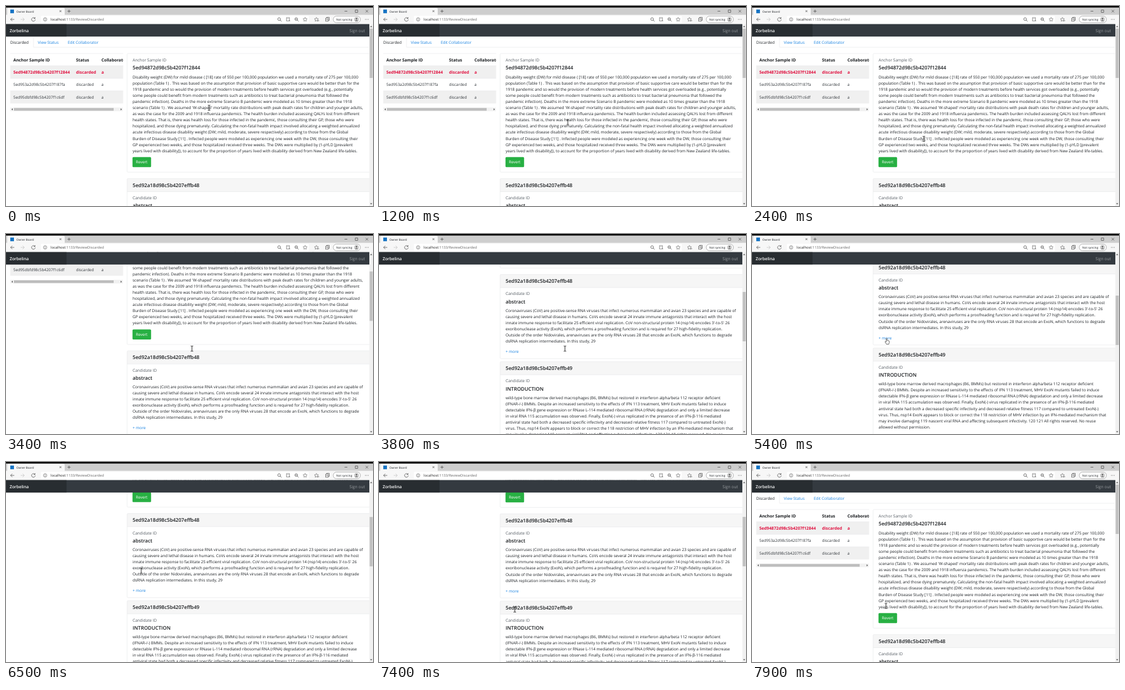
These frames come from a looping animation (600 by 328 pixels, 8 s). An HTML page:

```html
<!DOCTYPE html>
<html lang="en">
<head>
<meta charset="utf-8">
<title>Review page</title>
<style>
  @property --scroll { syntax: "<number>"; inherits: true; initial-value: 0; }
  html, body { margin: 0; width: 100%; height: 100%; overflow: hidden; background: #fff; }
  #stage {
    display: block; width: 100vw; height: 100vh;
    font: 6.45px "Open Sans", "Noto Sans", sans-serif;
    text-rendering: geometricPrecision;
    animation: scroll 8s linear infinite;
  }
  text { fill: #1d2125; white-space: pre; }
  .page { transform: translateY(calc(var(--scroll) * -1px)); }
  .thumb { transform: translateY(calc(var(--scroll) * .268px)); }
  .title { font-size: 8.15px; font-weight: 600; fill: #16191c; }
  .label { font-size: 6.6px; fill: #555c63; }
  .tab { font-size: 6.4px; }
  .link { fill: #1580e0; }
  .head { font-size: 6.75px; font-weight: 700; fill: #16191c; }
  .cell { font-size: 6.4px; fill: #30353a; }
  .picked { fill: #e0103f; }
  .line { fill: none; stroke: #e4e6e8; stroke-width: .6; }
  .icon { fill: none; stroke: #555; stroke-width: .8; }
  .cursor { animation: move 8s linear infinite; }
  .beam { animation: beam 8s step-end infinite; }
  .hand { animation: hand 8s step-end infinite; }
  @keyframes scroll {
    0%, 38.75% { --scroll: 0; }
    42.5% { --scroll: 91; }
    47.5% { --scroll: 216.5; }
    50%, 78% { --scroll: 239; }
    80.5%, 92.5% { --scroll: 198.5; }
    97.5%, 100% { --scroll: 0; }
  }
  @keyframes move {
    0%, 4% { transform: translate(332px, 167px); }
    28%, 34% { transform: translate(281px, 218px); }
    38%, 51% { transform: translate(304px, 188px); }
    61%, 81% { transform: translate(221px, 176px); }
    88%, 92.5% { transform: translate(222px, 242px); }
    97.5%, 100% { transform: translate(219px, 236px); }
  }
  @keyframes beam { 0% { opacity: 1; } 60% { opacity: 0; } 80% { opacity: 1; } }
  @keyframes hand { 0% { opacity: 0; } 60% { opacity: 1; } 80% { opacity: 0; } }
</style>
</head>
<body>
<svg id="stage" viewBox="0 0 600 328" preserveAspectRatio="none">
  <rect width="600" height="328" fill="#fff"/>

  <g class="page">
    <path class="line" d="M45 52.5V67.7H593"/>
    <text class="tab" x="7" y="61.6">Discarded</text>
    <text class="tab link" x="52" y="61.6">View Status</text>
    <text class="tab link" x="101" y="61.6">Edit Collaborator</text>

    <svg width="191.5" height="200">
      <rect x="7" y="98" width="185" height="20.6" fill="#f0f0f0"/>
      <rect x="7" y="139.2" width="185" height="20.6" fill="#f0f0f0"/>
      <path class="line" d="M7 78H192M7 98H192M7 118.6H192M7 139.2H192"/>
      <g id="table"></g>
      <rect x="7" y="166.5" width="184" height="6" fill="#f1f1f1"/>
      <rect x="13" y="167.3" width="163" height="4.4" fill="#bdbdbd"/>
      <path d="M11 167.8v3.4l-2-1.7zM187.5 167.8v3.4l2-1.7z" fill="#555"/>
    </svg>

    <rect class="line" x="198" y="78" width="402" height="194.5" rx="1.5"/>
    <text class="label" x="207" y="91.4">Anchor Sample ID</text>
    <text class="title" x="207" y="103.9">5ed94872d98c5b4207f12844</text>
    <g id="anchor"></g>
    <rect x="206.8" y="247.8" width="30.4" height="16.5" rx="1.6" fill="#28b043"/>
    <text class="tab" x="212.3" y="258.4" style="fill:#fff">Revert</text>

    <g id="cards"></g>
  </g>

  <!-- navigation bar -->
  <rect y="29.4" width="594" height="20.7" fill="#343a40"/>
  <rect y="29.4" width="99" height="20.7" fill="#282d31"/>
  <text x="6" y="42.5" style="font-size:6.8px;font-weight:600;fill:#fff">Zorbelina</text>
  <text x="561.5" y="42.5" style="font-size:6.7px;fill:#969a9d">Sign out</text>

  <!-- page scrollbar -->
  <rect x="594" y="29.4" width="6" height="298.6" fill="#f1f1f1"/>
  <rect class="thumb" x="594.5" y="37" width="5" height="81" fill="#c1c1c1"/>
  <path d="M595.2 34.5h3.6l-1.8-2zM595.2 323.5h3.6l-1.8 2z" fill="#555"/>

  <!-- window frame -->
  <rect width="600" height="15" fill="#cecece"/>
  <rect width="600" height="2.5" fill="#050505"/>
  <path d="M2 15V5q0-2 2-2h90q2 0 2 2v10z" fill="#f7f7f7"/>
  <rect x="7" y="5.8" width="6" height="6" fill="#1674c4"/>
  <text x="17" y="10.6" style="font-size:4.6px">Owner Board</text>
  <path class="icon" d="M87.5 7l3 3m0-3l-3 3M100.500 8.500h5m-2.500-2.500v5M553.500 8.500h4.500M571 6.500h4v4h-4zM588 6.500l4 4m0-4l-4 4"/>
  <rect y="14.5" width="600" height="14.9" fill="#f7f7f7"/>
  <rect x="57" y="16" width="438" height="12.5" rx="2" fill="#fff"/>
  <g class="icon">
    <path d="M13.5 22H7.5m2.7-2.7L7.5 22l2.7 2.7"/>
    <path d="M24 22h6m-2.7-2.7L30 22l-2.7 2.7" stroke="#c4c4c4"/>
    <path d="M47 20a3 3 0 1 0 .8 2.2M47.5 18.5v2h-2"/>
    <circle cx="64" cy="22" r="2.8" stroke-width=".6"/>
    <path d="M64 21.6v2M64 20v.7"/>
    <circle cx="446.5" cy="21.5" r="2.2"/><path d="M448 23l2.5 2.3"/>
    <path d="M458.5 19h5v5.5h-5zM460 21h2M462.5 23l2 2" stroke-width=".6"/>
    <circle cx="474.5" cy="21.5" r="2.2"/><path d="M476 23l2.5 2.3M473.3 21.5h2.4" stroke-width=".7"/>
    <path id="star" d="M489 18.7l1 2.1 2.3.3-1.7 1.6.4 2.3-2-1.1-2 1.1.4-2.3-1.7-1.6 2.3-.3z" stroke-width=".6"/>
    <use href="#star" x="18.5"/>
    <path d="M522.5 20h4.5v5h-4.5zM524 20v-1.5h4.5v5H527M523.5 22.5h2.5" stroke-width=".7"/>
    <path d="M509.5 24h2.5"/>
  </g>
  <rect x="535" y="16.5" width="44.5" height="11" rx="5.5" fill="#fff" stroke="#888" stroke-width=".6"/>
  <text x="540" y="23.7" style="font-size:4.8px">Not syncing</text>
  <circle cx="573" cy="22" r="4.2" fill="#d0d0d0"/>
  <circle cx="573" cy="20.8" r="1.3" fill="#666"/>
  <path d="M570.5 24.5q2.5-3 5 0z" fill="#666"/>
  <path d="M587 22h.9m1.5 0h.9m1.5 0h.9" stroke="#444" stroke-width=".9"/>
  <text x="73" y="24.2" style="font-size:5.8px;fill:#666"><tspan fill="#222">localhost</tspan>:1133/ReviewDiscarded</text>

  <g class="cursor">
    <path class="beam" d="M-2-4.2h1.5l.5.5.5-.5H2M0-3.7V3.7M-2 4.2h1.5l.5-.5.5.5H2" fill="none" stroke="#111" stroke-width=".9"/>
    <path class="hand" d="M-1.6-4.5q.8-.8 1.5 0v3q2.5 0 3.4 1V2.5L2.5 4.8h-3.6L-3.3 1.2q-.2-1.1.7-1l1 .9z" fill="#fff" stroke="#111" stroke-width=".6"/>
  </g>
</svg>

<script>
const byId = id => document.getElementById(id);

function add(parent, tag, attrs, content = "") {
  const el = document.createElementNS("http://www.w3.org/2000/svg", tag);
  for (const key in attrs) el.setAttribute(key, attrs[key]);
  el.textContent = content;
  parent.append(el);
}

const write = (parent, x, y, content, name = "") =>
  add(parent, "text", { x, y, class: name }, content);

const paragraph = (parent, y, copy) => copy.trim().split("\n")
  .forEach((line, i) => write(parent, 207, y + i * 10.03, line.trim()));

[
  ["Anchor Sample ID", "Status", "Collaborator", "head"],
  ["5ed94872d98c5b4207f12844", "discarded", "a", "head picked"],
  ["5ed953a2d98c5b4207f187fa", "discarded", "a", "cell"],
  ["5ed95dbfd98c5b4207f1c6df", "discarded", "a", "cell"]
].forEach(([id, status, who, name], row) => {
  const y = 90.5 + row * 20.45;
  write(byId("table"), 12, y, id, name);
  write(byId("table"), 114.5, y, status, name);
  write(byId("table"), 156, y, who, name);
});

paragraph(byId("anchor"), 119.2, `
  Disability weight (DW) for mild disease ( [18] rate of 550 per 100,000 population we used a mortality rate of 275 per 100,000
  population (Table 1) . This was based on the assumption that provision of basic supportive care would be better than for the
  1918 pandemic and so would the provision of modern treatments before health services got overloaded (e.g., potentially
  some people could benefit from modern treatments such as antibiotics to treat bacterial pneumonia that followed the
  pandemic infection). Deaths in the more extreme Scenario B pandemic were modeled as 10 times greater than the 1918
  scenario (Table 1) . We assumed 'W-shaped' mortality rate distributions with peak death rates for children and younger adults,
  as was the case for the 2009 and 1918 influenza pandemics. The health burden included assessing QALYs lost from different
  health states. That is, there was health loss for those infected in the pandemic, those consulting their GP, those who were
  hospitalized, and those dying prematurely. Calculating the non-fatal health impact involved allocating a weighted annualized
  acute infectious disease disability weight (DW; mild, moderate, severe respectively) according to those from the Global
  Burden of Disease Study [11] . Infected people were modeled as experiencing one week with the DW, those consulting their
  GP experienced two weeks, and those hospitalized received three weeks. The DWs were multiplied by (1-pYLD [prevalent
  years lived with disability]), to account for the proportion of years lived with disability derived from New Zealand life-tables.`);

function card(top, height, id, section, copy) {
  const g = byId("cards");
  add(g, "rect", { x: 198, y: top, width: 402, height: 21.5, fill: "#f6f6f6" });
  add(g, "rect", { x: 198, y: top, width: 402, height, rx: 1.5, class: "line" });
  add(g, "path", { d: `M198 ${top + 21.5}H600`, class: "line" });
  write(g, 207, top + 13.8, id, "title");
  write(g, 207, top + 34, "Candidate ID", "label");
  write(g, 207, top + 47.2, section, "title");
  paragraph(g, top + 61.4, copy);
}

card(283, 138, "5ed92a18d98c5b4207effb48", "abstract", `
  Coronaviruses (CoV) are positive-sense RNA viruses that infect numerous mammalian and avian 23 species and are capable of
  causing severe and lethal disease in humans. CoVs encode several 24 innate immune antagonists that interact with the host
  innate immune response to facilitate 25 efficient viral replication. CoV non-structural protein 14 (nsp14) encodes 3'-to-5' 26
  exoribonuclease activity (ExoN), which performs a proofreading function and is required for 27 high-fidelity replication.
  Outside of the order Nidovirales, arenaviruses are the only RNA viruses 28 that encode an ExoN, which functions to degrade
  dsRNA replication intermediates. In this study, 29`);
write(byId("cards"), 207, 411.6, "+ more", "link");

card(426, 170, "5ed92a18d98c5b4207effb49", "INTRODUCTION", `
  wild-type bone marrow derived macrophages (B6, BMMs) but restored in interferon alpha/beta 112 receptor deficient
  (IFNAR-/-) BMMs. Despite an increased sensitivity to the effects of IFN 113 treatment, MHV ExoN mutants failed to induce
  detectable IFN-β gene expression or RNase L-114 mediated ribosomal RNA (rRNA) degradation and only a limited decrease
  in viral RNA 115 accumulation was observed. Finally, ExoN(-) virus replicated in the presence of an IFN-β-116 mediated
  antiviral state had both a decreased specific infectivity and decreased relative fitness 117 compared to untreated ExoN(-)
  virus. Thus, nsp14 ExoN appears to block or correct the 118 restriction of MHV infection by an IFN-mediated mechanism that
  may involve damaging 119 nascent viral RNA and affecting subsequent infectivity. 120 121 All rights reserved. No reuse
  allowed without permission.`);
</script>
</body>
</html>
```
